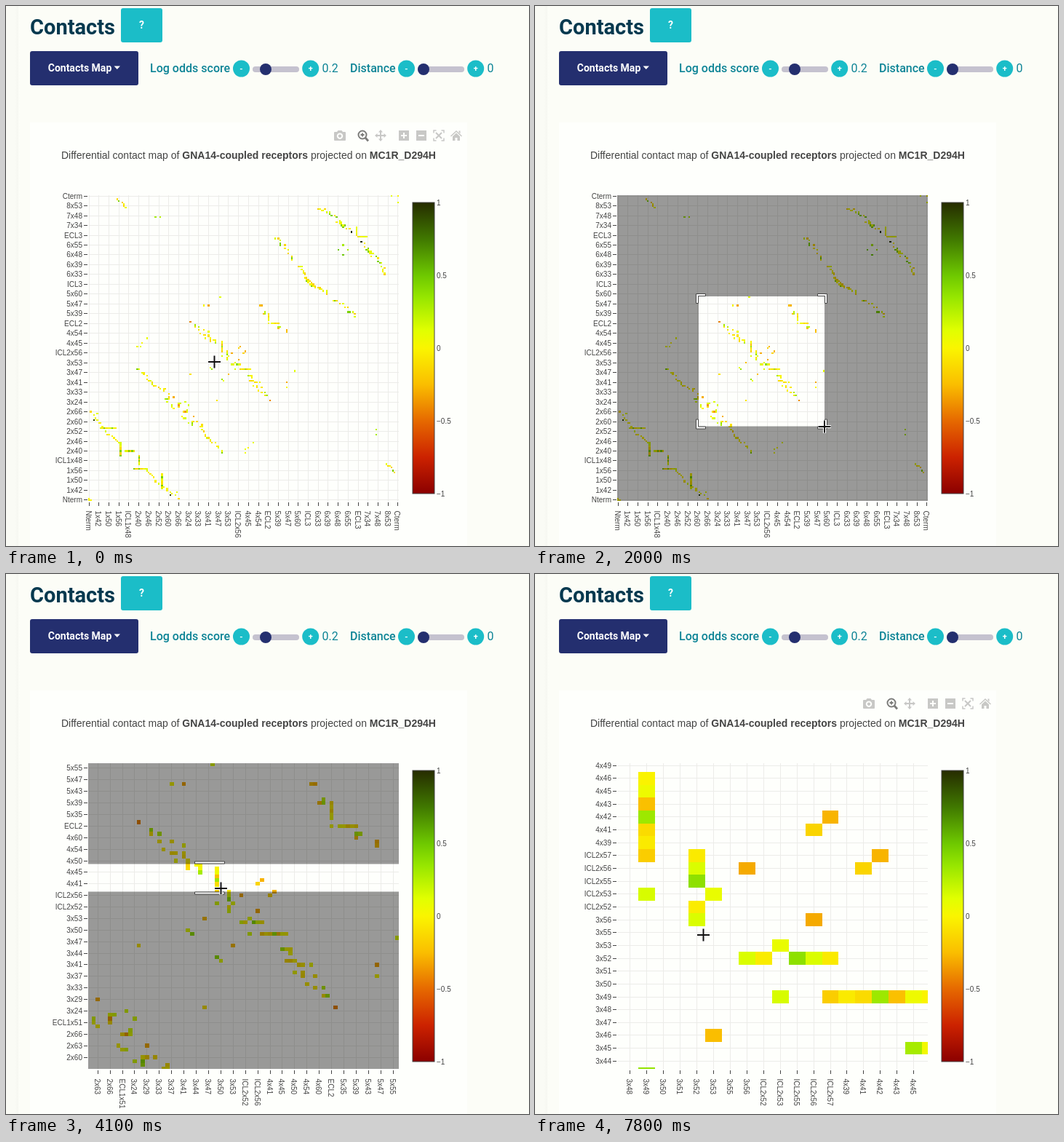
Animation of 719 by 742 pixels, one loop 8 s. Source, as an HTML page:

```html
<!DOCTYPE html>
<html lang="en">
<head>
<meta charset="utf-8">
<title>Contacts map</title>
<style>
  html, body { margin: 0; width: 100%; height: 100%; overflow: hidden; background: #fcfdf7; }
  svg { display: block; }
  text { font-family: "Liberation Sans", Arial, sans-serif; fill: #444; }
  .ui text { font-family: Roboto, sans-serif; }
  .ui .w { fill: #fff; font-weight: 700; text-anchor: middle; }
  .ui .lab { font-size: 16px; font-weight: 500; fill: #0d8496; }
  .ui .num { font-size: 16px; fill: #0d8496; }
  #heading { font-weight: 700; font-stretch: 75%; fill: #06394f; }
  .axis text { font-size: 10px; }
  .grid { stroke: #ecece9; }
  .tick { stroke: #444; }
  .grid, .tick, .cells { shape-rendering: crispEdges; }
  #tip text { font-size: 13px; fill: #fff; }
</style>
</head>
<body>
<svg width="719" height="742" viewBox="0 0 719 742">
  <defs>
    <clipPath id="plot"><rect x="113" y="260" width="427" height="420"/></clipPath>
    <linearGradient id="scale" x1="0" y1="1" x2="0" y2="0"></linearGradient>
    <linearGradient id="edge"><stop stop-color="#fafbf5"/><stop offset=".7" stop-color="#fafbf5"/><stop offset="1" stop-color="#f6f7f1"/></linearGradient>
  </defs>
  <rect width="719" height="742" fill="#fcfdf7"/>
  <rect width="17" height="742" fill="url(#edge)"/>
  <rect x="33" y="160" width="601" height="582" fill="#fefffc"/>

  <g class="ui" id="ui">
    <text id="heading" x="33" y="38.5" font-size="29">Contacts</text>
    <rect x="158" y="3" width="57" height="47" rx="3" fill="#1bbdc8"/>
    <text class="w" x="186.5" y="31" font-size="14">?</text>
    <rect x="33" y="62" width="149" height="47" rx="3" fill="#242f6f"/>
    <text class="w" x="101.5" y="90" font-size="14">Contacts Map</text>
    <path d="M148.500 82.500h8.500l-4.250 4.500z" fill="#fff"/>
    <text class="lab" x="198" y="91">Log odds score</text>
    <text class="num" x="434.500" y="91">0.2</text>
    <text class="lab" x="473" y="91">Distance</text>
    <text class="num" x="661.500" y="91">0</text>
  </g>

  <g id="bar" fill="#c8c8c6" stroke="none">
    <path fill-rule="evenodd" d="M452 173h3l1.500-2h5l1.500 2h3q1 0 1 1v10q0 1-1 1h-14q-1 0-1-1v-10q0-1 1-1zM459 174.500a4.200 4.200 0 1 0 .01 0zM459 176.500a2.200 2.200 0 1 1-.01 0z"/>
    <g fill="none" stroke="#7c7c7a" stroke-width="2"><circle cx="490" cy="177" r="5.500"/><path d="M494 181l4 4.500" stroke-width="2.800"/><path d="M487.500 177h5M490 174.500v5" stroke-width="1.800"/></g>
    <path d="M515 170l3 3.500h-2v3.500h3.500v-2l3.500 3-3.500 3v-2h-3.500v3.500h2l-3 3.500-3-3.500h2v-3.500h-3.500v2l-3.500-3 3.500-3v2h3.500v-3.500h-2z"/>
    <path fill-rule="evenodd" d="M540 171h14v14h-14zM546 174v3h-3v2h3v3h2v-3h3v-2h-3v-3z"/>
    <path fill-rule="evenodd" d="M564 171h14v14h-14zM567 177v2h8v-2z"/>
    <g fill="none" stroke="#c8c8c6" stroke-width="1.500"><path d="M588 174.500v-3.500h3.500M598.500 171h3.500v3.500M602 181.500v3.500h-3.500M591.500 185h-3.500v-3.500"/><path d="M591 174l8 8M599 174l-8 8" stroke-width="2"/></g>
    <path d="M619 171l8 7.500-1 1-7-6.500-7 6.500-1-1zM619 174.500l5 4.700v5.800h-3.500v-4h-3v4h-3.500v-5.800zM622.500 171.500h2v4l-2-2z"/>
  </g>

  <text x="76" y="210" font-size="14">Differential contact map of <tspan font-weight="700">GNA14-coupled receptors</tspan> projected on <tspan font-weight="700">MC1R_D294H</tspan></text>
  <g class="axis" id="legend"><rect x="559" y="270" width="30" height="400" fill="url(#scale)" stroke="#444"/></g>
  <g class="axis" id="views"></g>
  <path id="dim" fill-rule="evenodd"/>
  <path id="corners" fill="#fff" stroke="#444"/>
  <g id="tip">
    <path d="M303.500 404.500l6-6v-22h91v56h-91v-22z" fill="#444" stroke="#fff"/>
    <text x="313" y="391">x: 3x56</text><text x="313" y="408">y: ICL2x56</text><text x="313" y="425">z: −0.3012</text>
  </g>
  <g id="cursor" fill="none"><path d="M-9 0H9M0-9V9" stroke="#fff" stroke-width="4"/><path d="M-8.500 0H8.500M0-8.500V8.500" stroke="#111" stroke-width="2"/></g>
</svg>
<script>
const $ = id => document.getElementById(id);
const add = (el, html) => el.insertAdjacentHTML('beforeend', html);
const PLOT = { l: 113, t: 260, w: 427, h: 420 };

// Colour scale: value, red, green (blue is always 0)
const STOPS = [[-1, 139, 0], [-.75, 204, 34], [-.5, 230, 105], [-.25, 250, 190], [0, 250, 245],
  [.12, 225, 255], [.35, 150, 230], [.5, 110, 200], [.75, 64, 120], [1, 38, 44]];

// Linear interpolation in rows of [key, a, b], held at both ends
function track(rows, k) {
  let n = rows.findIndex(r => r[0] >= k);
  if (n < 0) n = rows.length - 1;
  const b = rows[n], a = rows[Math.max(0, n - 1)];
  const f = b === a ? 0 : Math.min(1, (k - a[0]) / (b[0] - a[0]));
  return [a[1] + (b[1] - a[1]) * f, a[2] + (b[2] - a[2]) * f];
}
const colour = v => `rgb(${track(STOPS, v).map(Math.round)},0)`;

// Header controls
for (const [x, thumb] of [[323.5, 357], [550.5, 574]]) {
  add($('ui'), `<rect x="${x + 15.5}" y="83" width="64" height="8" rx="4" fill="#c5c2cf"/><circle cx="${thumb}" cy="87" r="8" fill="#242f6f"/>`);
  for (const [cx, sign] of [[x, '-'], [x + 95.2, '+']])
    add($('ui'), `<circle cx="${cx}" cy="86" r="11.500" fill="#1bbdc8"/><text class="w" x="${cx}" y="90" font-size="11">${sign}</text>`);
}
const head = $('heading');
head.setAttribute('font-size', 29 * 117 / head.getComputedTextLength());

// Colour bar
for (const [v] of STOPS) add($('scale'), `<stop offset="${(v + 1) / 2}" stop-color="${colour(v)}"/>`);
['1', '0.5', '0', '−0.5', '−1'].forEach((s, n) => add($('legend'), `<text x="592" y="${273.5 + n * 100}">${s}</text>`));

// Symmetric contact matrix
const cells = new Map();
let seed = 7;
const rnd = () => (seed = seed * 16807 % 2147483647) / 2147483647;
const put = (i, j, v) => { cells.set(i + ',' + j, [i, j, v]); cells.set(j + ',' + i, [j, i, v]); };
const run = (i, j, ...vals) => vals.forEach((v, n) => put(i, j + n, v));
const anyValue = () => rnd() < .12 ? .45 : rnd() * .38 - .2;
const fill = (i, j0, j1) => { for (let j = j0; j <= j1; j++) put(i, j, anyValue()); };
function strand(x0, y0, x1, y1, n) {
  for (let k = 0; k < n; k++) {
    const f = k / (n - 1), jog = () => rnd() * 1.6 - .8;
    put(Math.round(x0 + (x1 - x0) * f + jog()), Math.round(y0 + (y1 - y0) * f + jog()), anyValue());
  }
}
// Helices 1, 2 and 7
run(0, 0, 0, 0);
strand(2, 53, 7, 45, 7); run(5, 53, .1); run(3, 49, .95);
fill(44, 7, 16); strand(9, 43, 18, 35, 9); fill(19, 27, 35); fill(30, 22, 27);
strand(17, 184, 22, 180, 7); run(40, 173, .3); run(43, 173, .25);
run(182, 186, .1); run(186, 186, 0);
// Helix 2 with 3 and 4
run(29, 94, .05); run(31, 94, .1); run(32, 96, 0); run(35, 99, .08);
strand(29, 80, 35, 76, 6); strand(35, 74, 40, 70, 7); strand(42, 69, 45, 67, 3);
run(45, 68, 0); run(46, 68, -.1); run(46, 62, .3); run(47, 60, .15); run(47, 62, .38);
run(48, 62, 0, -.15); run(48, 65, -.1); run(50, 57, .05, .15); run(51, 56, 0); run(51, 63, -.3);
run(54, 57, -.1, -.35, .1); run(55, 59, .15); run(58, 60, .15);
// Helix 3 with 4 and 5
run(61, 77, -.08); run(61, 109, -.42); run(64, 106, -.08, .3); run(66, 104, -.05); run(66, 106, .25);
run(67, 102, -.04); run(69, 101, -.1); run(69, 104, -.06); run(70, 99, .05); run(70, 101, -.08);
run(72, 100, -.1, -.05); run(72, 103, .06); run(73, 97, -.12, -.15, -.02); run(73, 81, .1);
run(75, 98, .02); run(76, 96, .3, .04, -.02); run(74, 80, .36); run(77, 84, -.25);
run(80, 88, .15); run(80, 91, -.18, -.05, -.12, .33, -.24, .06, -.01);
run(83, 86, .14, -.04); run(83, 89, .38, .14, -.05); run(84, 88, .08);
run(86, 90, -.31); run(90, 93, -.15); run(91, 94, -.28);
run(69, 119, .02); run(72, 119, -.32); run(79, 124, .12);
run(103, 119, -.24); run(104, 119, -.28); run(105, 114, -.25); run(106, 114, .28, .22);
run(108, 108, .03); run(108, 110, .05, .02, -.15, -.04, -.12);
// Helices 5, 6 and 7
strand(113, 160, 116, 157, 5); strand(118, 155, 122, 147, 8);
strand(127, 144, 130, 136, 13); strand(130, 136, 135, 131, 14);
strand(137, 178, 143, 177, 6); strand(144, 176, 149, 173, 5); strand(150, 171, 156, 165, 15);
fill(161, 162, 167); run(158, 164, .98); run(153, 156, -.2); run(150, 153, .5); run(153, 156, .3);

// Axis labels: first index, step and names
const VIEWS = [
  { x: [-.5, 186.5], y: [-.5, 186.5], first: 0, step: 6,
    names: 'Nterm 1x42 1x50 1x56 ICL1x48 2x40 2x46 2x52 2x60 2x66 3x24 3x33 3x41 3x47 3x53 ICL2x56 4x45 4x54 ECL2 5x39 5x47 5x60 ICL3 6x33 6x39 6x48 6x55 ECL3 7x34 7x48 8x53 Cterm' },
  { x: [48.66, 124.37], y: [44.98, 124.32], first: 48, step: 3,
    names: '2x60 2x63 2x66 ECL1x51 3x24 3x29 3x33 3x37 3x41 3x44 3x47 3x50 3x53 ICL2x52 ICL2x56 4x41 4x45 4x50 4x54 4x60 ECL2 5x35 5x39 5x43 5x47 5x55' },
  { x: [78.215, 96.845], y: [74.394, 98.187], first: 75, step: 1,
    names: '3x44 3x45 3x46 3x47 3x48 3x49 3x50 3x51 3x52 3x53 3x55 3x56 ICL2x52 ICL2x53 ICL2x55 ICL2x56 ICL2x57 4x39 4x41 4x42 4x43 4x45 4x46 4x49' }
];

function build(view) {
  const sx = PLOT.w / (view.x[1] - view.x[0]), sy = PLOT.h / (view.y[1] - view.y[0]);
  const px = i => PLOT.l + (i - view.x[0]) * sx;
  const py = j => PLOT.t + PLOT.h - (j - view.y[0]) * sy;
  const inside = (k, [a, b]) => k >= a && k <= b;
  let lines = '', marks = '', labels = '', rects = '';
  view.names.split(' ').forEach((name, n) => {
    const k = view.first + n * view.step;
    if (inside(k, view.x)) {
      const x = Math.floor(px(k)) + .5;
      lines += `M${x} 260V680`;
      marks += `M${x} 682v5`;
      labels += `<text transform="translate(${x - 5} 693.500) rotate(90)">${name}</text>`;
    }
    if (inside(k, view.y)) {
      const y = Math.floor(py(k)) + .5;
      lines += `M113 ${y}H540`;
      marks += `M107 ${y}h5`;
      labels += `<text x="105" y="${y + 3.5}" text-anchor="end">${name}</text>`;
    }
  });
  for (const [i, j, v] of cells.values())
    if (inside(i, [view.x[0] - .5, view.x[1] + .5]) && inside(j, [view.y[0] - .5, view.y[1] + .5]))
      rects += `<rect x="${px(i - .5)}" y="${py(j + .5)}" width="${sx}" height="${sy}" fill="${colour(v)}"/>`;
  add($('views'), `<g><path class="grid" d="${lines}"/><path class="tick" d="${marks}"/>${labels}<g class="cells" clip-path="url(#plot)">${rects}</g></g>`);
  view.el = $('views').lastElementChild;
  view.cells = view.el.lastElementChild;
}
VIEWS.forEach(build);

// Time, x, y
const POINTER = [[200, 286.5, 489], [400, 294, 491], [1000, 224.5, 400], [1100, 224.5, 400], [1200, 230, 406],
  [1300, 249, 426], [2000, 398, 578], [2400, 398, 578], [2900, 379, 558], [3000, 379, 558], [3500, 283, 408],
  [3700, 279.5, 399], [3800, 279.5, 399], [4100, 295.5, 432], [4600, 403, 530], [4700, 403, 530], [4800, 385, 525],
  [5000, 385, 525], [5800, 482, 494], [6000, 482, 494], [6200, 341, 450], [6300, 341, 450], [6400, 298, 418],
  [7000, 298, 418], [7100, 344, 412], [7300, 221, 476], [7500, 221, 476], [7600, 329, 439], [7800, 231.5, 496]];
const DRAGS = [
  { from: 1200, to: 2500, x: 225, y: 399, end: [[1200, 236, 412], [1300, 260, 440], [2000, 398, 577.5]] },
  { from: 3900, to: 5000, x: 280, y: 398.5, end: [[3900, 283, 408], [4100, 295, 436.5], [4600, 403, 531], [4700, 403, 531], [4800, 385, 524.5]] }
];

const show = (el, on) => { el.style.display = on ? '' : 'none'; };

function drawDrag(d, t) {
  const [x, y] = track(d.end, t), band = x - d.x < 20 && y - d.y > (x - d.x);
  const l = band ? 113 : d.x, r = band ? 540 : x;
  let path;
  if (band) path = `M${d.x - 20.5} ${d.y - .5}h41v-3h-41zM${d.x - 20.5} ${y + .5}h41v3h-41z`;
  else {
    const c = Math.floor(Math.min(x - d.x, y - d.y, 20) / 2);
    const corner = (cx, cy, h, v) =>
      `M${cx - 3.5 * h} ${cy + (c - .5) * v}h${3 * h}v${-c * v}h${c * h}v${-3 * v}h${-(c + 3) * h}z`;
    path = corner(l, d.y, 1, 1) + corner(r, d.y, -1, 1) + corner(r, y, -1, -1) + corner(l, y, 1, -1);
  }
  $('corners').setAttribute('d', path);
  $('dim').setAttribute('d', `M113 260H540V680H113zM${l} ${d.y}H${r}V${y}H${l}z`);
  $('dim').setAttribute('fill-opacity', .4 * Math.min(1, (t - d.from + 5) / 200));
}

function render(time) {
  const t = Math.floor(time % 8000 / 100) * 100;
  const now = t < 2500 ? 0 : t < 5000 ? 1 : 2;
  VIEWS.forEach((v, n) => show(v.el, n === now));
  show(VIEWS[1].cells, t >= 2800);
  show(VIEWS[2].cells, t >= 5300);

  const drag = DRAGS.find(d => t >= d.from && t < d.to);
  show($('dim'), drag);
  show($('corners'), drag);
  if (drag) drawDrag(drag, t);
  const opened = now ? DRAGS[now - 1].to : -1000;
  $('bar').setAttribute('opacity', drag ? Math.max(0, 1 - (t - drag.from + 100) / 300) : Math.min(1, (t - opened + 100) / 300));

  show($('tip'), t >= 6600 && t < 6900);
  $('cursor').setAttribute('transform', `translate(${track(POINTER, t)})`);
}

let start;
function loop(time) {
  start ??= time;
  render(time - start);
  requestAnimationFrame(loop);
}
render(0);
requestAnimationFrame(loop);
</script>
</body>
</html>
```
